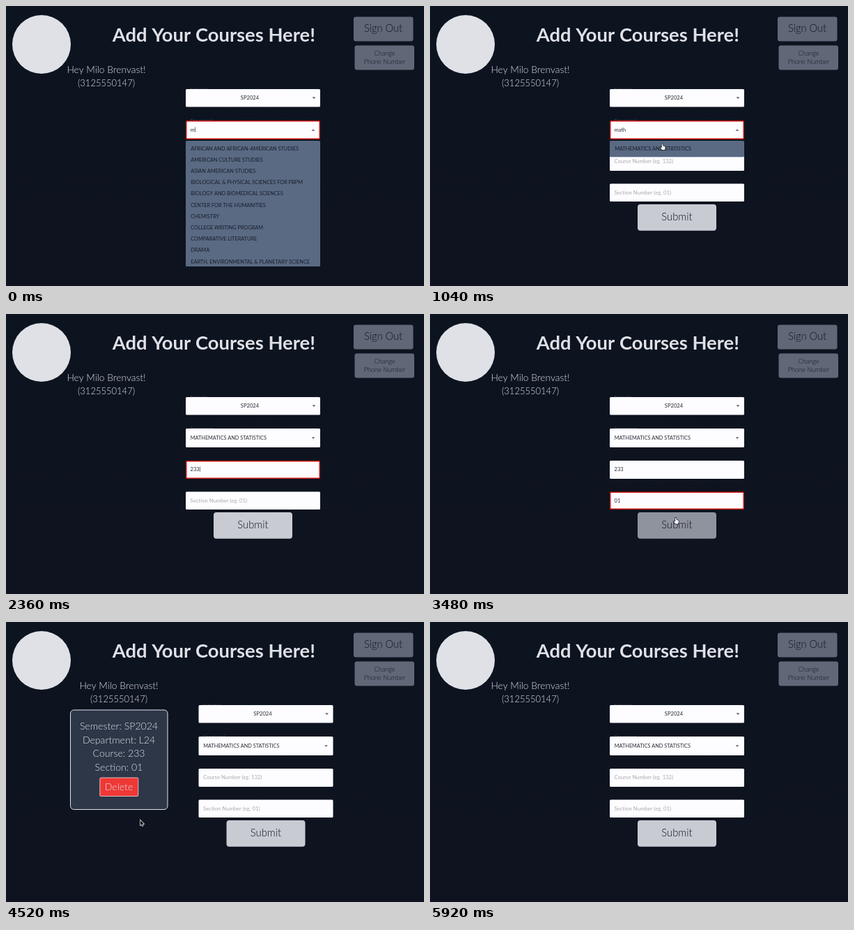
Animation of 600 by 401 pixels, one loop 6520 ms. Source, as an HTML page with a canvas:

```html
<!DOCTYPE html>
<html lang="en">
<head>
<meta charset="utf-8">
<title>Add Your Courses</title>
<style>
  html, body { margin: 0; width: 100%; height: 100%; overflow: hidden; background: #0d131f; }
  canvas { display: block; width: 600px; height: 401px; }
</style>
</head>
<body>
<canvas id="stage"></canvas>
<script>
const W = 600, H = 401, LOOP = 6520;
const canvas = document.getElementById('stage');
const ctx = canvas.getContext('2d');
const dpr = window.devicePixelRatio || 1;
canvas.width = W * dpr;
canvas.height = H * dpr;

const INK = '#11151f', LIGHT = '#dfe1e7', WHITE = '#fdfcff', RED = '#cc1512';
const SLATE = '#606878', TYPED = '#2a2d36', HINT = '#a9abb3', THIN = 300;
const FIELD_W = 193;
const DEPARTMENT = 'MATHEMATICS AND STATISTICS';
const DEPARTMENTS = [
  'AFRICAN AND AFRICAN-AMERICAN STUDIES', 'AMERICAN CULTURE STUDIES',
  'ASIAN AMERICAN STUDIES', 'BIOLOGICAL & PHYSICAL SCIENCES FOR PBPM',
  'BIOLOGY AND BIOMEDICAL SCIENCES', 'CENTER FOR THE HUMANITIES', 'CHEMISTRY',
  'COLLEGE WRITING PROGRAM', 'COMPARATIVE LITERATURE', 'DRAMA',
  'EARTH, ENVIRONMENTAL & PLANETARY SCIENCE',
  'GERMANIC LANGUAGES AND LITERATURES', DEPARTMENT
];

// Times of the user's actions, in ms
const PICK = 1160, FOCUS_COURSE = 1680, FOCUS_SECTION = 2800, CLEAR = 3640;
const ADDED = 3800, DELETED = 5280;

// Typed values: [time, text]
const deptKeys = [[0, 'm'], [40, 'ma'], [160, 'mat'], [240, 'math'], [PICK, DEPARTMENT]];
const courseKeys = [[FOCUS_COURSE, ''], [2000, '2'], [2160, '23'], [2360, '233']];
const sectionKeys = [[FOCUS_SECTION, ''], [2920, '0'], [2960, '01']];

// Pointer legs: each is a visible stretch of [time, x, y] stops
const legs = [
  [[720, 385, 40], [1080, 332, 205], [1360, 331, 207], [1520, 321, 223], [2000, 321, 223]],
  [[2560, 321, 223], [2760, 326, 267], [2920, 326, 267]],
  [[3240, 326, 267], [3480, 353, 294], [3640, 355, 298], [4260, 355, 298], [4520, 193, 284],
   [4720, 181, 254], [4920, 181, 254], [5120, 169, 238], [5760, 169, 238], [5920, 312, 4]]
];

const mix = (a, b, k) => a + (b - a) * k;
const blend = (a, b, k) => `rgb(${a.map((v, i) => mix(v, b[i], k)).join()})`;
const ease = k => k * k * (3 - 2 * k);
const ramp = (t, from, to) => Math.min(1, Math.max(0, (t - from) / (to - from)));

function latest(keys, t) {
  let found = [0, ''];
  for (const key of keys) if (t >= key[0]) found = key;
  return found;
}

function pointerAt(t) {
  const leg = legs.find(l => t >= l[0][0] && t < l[l.length - 1][0]);
  if (!leg) return null;
  const i = leg.findIndex(p => p[0] > t);
  const [a, b] = [leg[i - 1], leg[i]];
  const k = ease(ramp(t, a[0], b[0]));
  return { x: mix(a[1], b[1], k), y: mix(a[2], b[2], k) };
}

function box(x, y, w, h, r, fill, stroke, line = 1) {
  ctx.beginPath();
  ctx.roundRect(x, y, w, h, r);
  if (fill) { ctx.fillStyle = fill; ctx.fill(); }
  if (stroke) { ctx.strokeStyle = stroke; ctx.lineWidth = line; ctx.stroke(); }
}

// y is the middle of the capital letters; returns the text width
function text(str, x, y, size, color, align = 'left', weight = 400) {
  ctx.font = `${weight} ${size}px Lato, "Open Sans", sans-serif`;
  ctx.textAlign = align;
  ctx.fillStyle = color;
  ctx.fillText(str, x, y + size * 0.36);
  return ctx.measureText(str).width;
}

function polygon(points, fill, stroke, line) {
  ctx.beginPath();
  points.forEach(([x, y]) => ctx.lineTo(x, y));
  ctx.closePath();
  if (stroke) { ctx.strokeStyle = stroke; ctx.lineWidth = line; ctx.stroke(); }
  ctx.fillStyle = fill;
  ctx.fill();
}

function chevron(x, y, up) {
  const d = up ? -1.2 : 1.2;
  polygon([[x - 2.4, y - d], [x + 2.4, y - d], [x, y + d]], '#55575f');
}

function field(x, y, h, focused) {
  box(x, y, FIELD_W, h, 1.5, focused ? RED : WHITE);
  if (focused) box(x + 1.5, y + 1.5, FIELD_W - 3, h - 3, 0.5, WHITE);
}

function inputText(x, y, keys, t, focused, size) {
  const [since, str] = latest(keys, t);
  const width = text(str, x, y, size, TYPED);
  if (focused && (t - since) % 1000 < 500) {
    ctx.fillStyle = INK;
    ctx.fillRect(x + width + 0.3, y - 3.5, 0.6, 7);
  }
}

function header() {
  const sky = ctx.createLinearGradient(0, 0, 0, H);
  sky.addColorStop(0, '#0c1420');
  sky.addColorStop(1, '#0e131f');
  ctx.fillStyle = sky;
  ctx.fillRect(0, 0, W, H);

  ctx.beginPath();
  ctx.arc(51, 55, 42, 0, Math.PI * 2);
  ctx.fillStyle = LIGHT;
  ctx.fill();

  text('Add Your Courses Here!', 298.3, 41, 27.4, LIGHT, 'center', 700);
  box(499, 15.5, 85.5, 35, 3, SLATE);
  text('Sign Out', 541.5, 32, 14.7, INK, 'center', THIN);
  box(500.5, 56.5, 85.5, 35, 3, SLATE);
  text('Change', 543.5, 67.3, 9.1, INK, 'center', THIN);
  text('Phone Number', 543.5, 79.5, 9.1, INK, 'center', THIN);
}

function greeting(x) {
  text('Hey Milo Brenvast!', x, 91.2, 13.8, LIGHT, 'center', THIN);
  text('(3125550147)', x, 110.7, 13, LIGHT, 'center', THIN);
}

function card(t) {
  box(92.5, 126, 139.5, 142.5, 5, '#2d3748', '#e2e5ea');
  ['Semester: SP2024', 'Department: L24', 'Course: 233', 'Section: 01']
    .forEach((line, i) => text(line, 162, 149.3 + i * 19.5, 14.1, LIGHT, 'center', THIN));
  const hover = ramp(t, 5040, 5160);
  box(134.8, 223, 55, 26.5, 1.5, blend([238, 56, 54], [197, 48, 48], hover), '#e9c9cc', 0.9);
  text('Delete', 162, 235.5, 14.1, LIGHT, 'center', THIN);
}

function menu(x, query) {
  const rows = DEPARTMENTS.filter(d => d.includes(query.toUpperCase()));
  const height = Math.min(180, rows.length * 16.2 + 7);
  ctx.save();
  box(x, 193, FIELD_W, height, 1.5, '#5a6a83');
  ctx.clip();
  rows.forEach((row, i) => text(row, x + 7.2, 204 + i * 16.2, 7.35, '#171e2b'));
  ctx.restore();
}

function form(x, t) {
  const onDept = t < FOCUS_COURSE;
  const onCourse = t >= FOCUS_COURSE && t < FOCUS_SECTION;
  const onSection = t >= FOCUS_SECTION && t < 3560;
  const open = t < PICK;

  text('Semester', x + 6.5, 118.6, 6, '#4d525d');
  text('Department', x + 6.5, 163.6, 6, '#4d525d');

  field(x, 119, 25.5, false);
  text('SP2024', x + 92, 131.5, 7.6, TYPED, 'center');
  chevron(x + 184, 131.8, false);

  field(x, 164, 27, onDept);
  inputText(x + 6.8, 177, deptKeys, t, onDept, 7.3);
  chevron(x + 183, 177.6, open);
  if (onDept && !open) {
    ctx.beginPath();
    for (const s of [-1, 1]) {
      ctx.moveTo(x + 169.2, 177.5 - 2.3 * s);
      ctx.lineTo(x + 173.8, 177.5 + 2.3 * s);
    }
    ctx.strokeStyle = '#55575f';
    ctx.lineWidth = 0.9;
    ctx.stroke();
  }

  field(x, 210, 26, onCourse);
  if (t < 2000 || t >= CLEAR) text('Course Number (eg. 132)', x + 6.6, 222.3, 7.7, HINT);
  if (t >= FOCUS_COURSE && t < CLEAR) inputText(x + 6.6, 222.3, courseKeys, t, onCourse, 7.5);

  field(x, 254.5, 25.5, onSection);
  if (t < 2920 || t >= CLEAR) text('Section Number (eg. 01)', x + 6.6, 267.2, 7.7, HINT);
  if (t >= FOCUS_SECTION && t < CLEAR) inputText(x + 6.6, 267.2, sectionKeys, t, onSection, 7.5);

  const hover = ramp(t, 3360, 3470) * (1 - ramp(t, 4340, 4480));
  box(x + 40, 284, 113, 37.7, 4, blend([201, 203, 211], [143, 147, 158], hover));
  text('Submit', x + 96.4, 301.7, 14.8, INK, 'center', THIN);

  if (open) menu(x, latest(deptKeys, t)[1]);
}

function arrow(x, y) {
  const shape = [[0, 0], [0, 7], [1.6, 5.6], [2.7, 8], [3.7, 7.5], [2.7, 5.2], [4.8, 5]];
  polygon(shape.map(([a, b]) => [x + a, y + b]), '#0a0a0c', '#f4f4f6', 1.4);
}

function hand(x, y) {
  const shape = [[-1, -2], [0.2, -2], [0.8, 1], [3.5, 1.6], [4, 3], [3.2, 6.5], [-0.8, 6.5], [-3, 3.2], [-2.2, 2.6], [-0.9, 3.6]];
  polygon(shape.map(([a, b]) => [x + a, y + b]), '#f8f8fa', '#16181f', 1.3);
}

function beam(x, y) {
  ctx.fillStyle = '#15171d';
  ctx.fillRect(x - 0.4, y - 3.2, 0.8, 6.4);
  ctx.fillRect(x - 1.4, y - 3.6, 2.8, 0.7);
  ctx.fillRect(x - 1.4, y + 2.9, 2.8, 0.7);
}

function pointer(t, left, hasCard) {
  const p = pointerAt(t);
  if (!p) return;
  const over = (x, y, w, h) => p.x > x && p.x < x + w && p.y > y && p.y < y + h;
  const onButton = over(left + 40, 284, 113, 37) || (hasCard && over(135, 223, 55, 26)) ||
    (t < PICK && over(left, 193, FIELD_W, 23));
  const onField = [164, 210, 254].some(y => over(left, y, FIELD_W, 26));
  (onButton ? hand : onField ? beam : arrow)(p.x, p.y);
}

function draw(t) {
  const hasCard = t >= ADDED && t < DELETED;
  const left = hasCard ? 276.5 : 258;
  ctx.setTransform(dpr, 0, 0, dpr, 0, 0);
  header();
  greeting(hasCard ? 162 : 144);
  if (hasCard) card(t);
  form(left, t);
  pointer(t, left, hasCard);
}

const start = performance.now();
function tick() {
  draw((performance.now() - start) % LOOP);
  requestAnimationFrame(tick);
}
tick();
</script>
</body>
</html>
```
